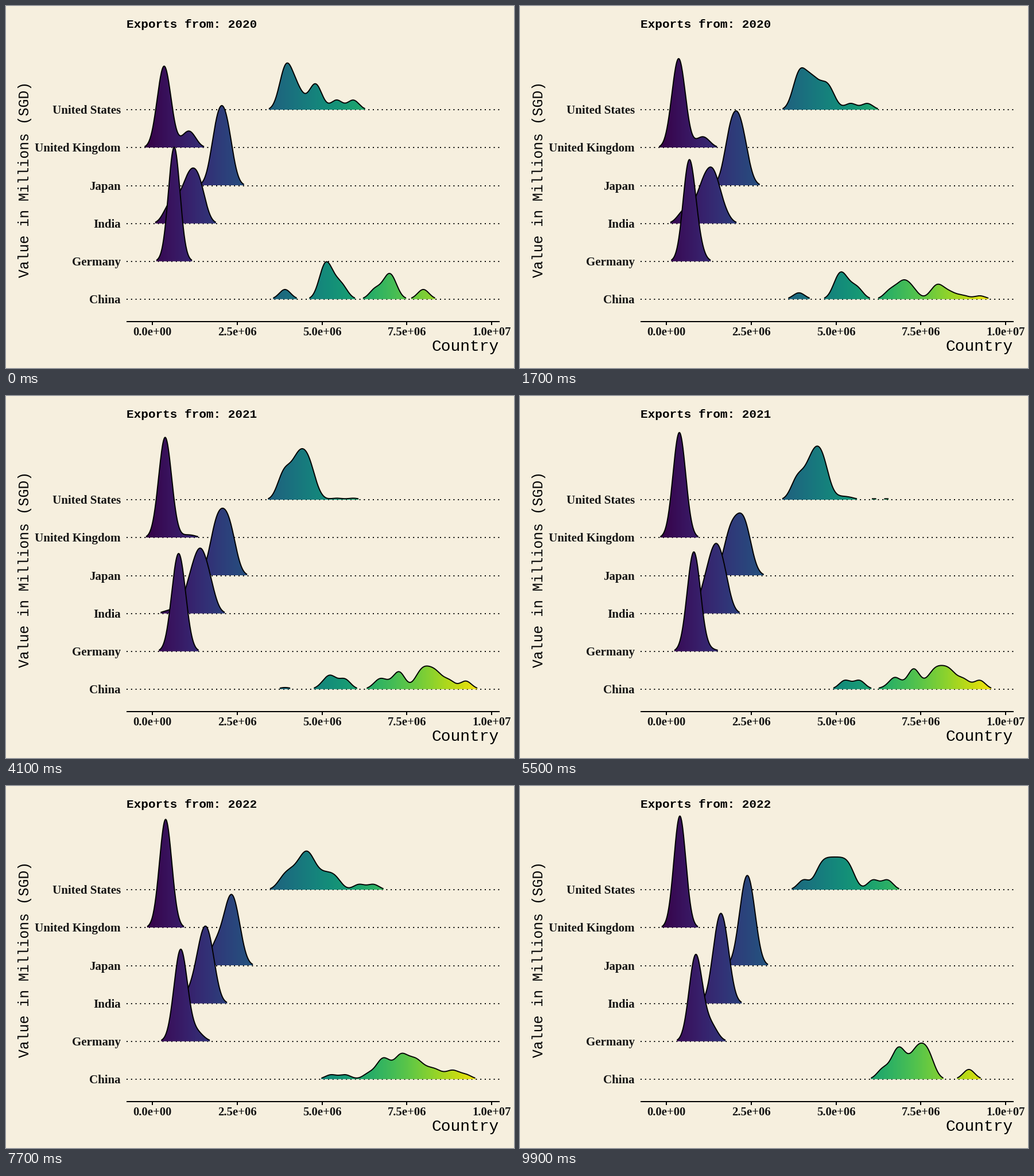
Write a matplotlib script that moves like this. It is 885 px wide and 632 px high and loops after 10 s.

```python
import numpy as np
import matplotlib.pyplot as plt
from matplotlib.animation import FuncAnimation
from matplotlib.path import Path

W, H, DPI = 885, 632, 100
PX = 72 / DPI
FRAMES, INTERVAL = 100, 100
BG, INK, TEXT = "#f6efde", "black", "#141414"
MONO, SERIF = "Liberation Mono", "Liberation Serif"
LEFT, RIGHT, AXIS_Y = 209.5, 859.5, 551
ROW0, ROW_STEP = 181.3, 66.1
BANDWIDTH = 10              # kernel width in pixels
UNIT = 16.9                 # height of one month's kernel
CUT = 0.0285 * ROW_STEP     # ridges are hidden below this height
X0, X1 = 238, 831           # span of the colour ramp

# For 2020, 2021 and 2022: clusters of evenly spaced months (first, last, count).
CLUSTERS = {
    "United States": ([(481, 495, 5), (504, 512, 2), (533, 545, 3), (576, 605, 2)],
                      [(478, 491, 3), (502, 533, 9)],
                      [(494, 494, 1), (519, 578, 9), (615, 640, 2)]),
    "United Kingdom": ([(266, 285, 10), (313, 324, 2)],
                       [(270, 285, 12)],
                       [(274, 283, 12)]),
    "Japan": ([(361, 391, 12)], [(358, 398, 12)], [(384, 408, 12)]),
    "India": ([(281, 299, 3), (310, 343, 9)],
              [(317, 339, 5), (335, 359, 7)],
              [(338, 362, 12)]),
    "Germany": ([(290, 296, 12)],
                [(294, 311, 12)],
                [(298, 314, 10), (326, 337, 2)]),
    "China": ([(486, 486, 1), (551, 563, 4), (575, 587, 2),
               (643, 643, 1), (662, 675, 3), (727, 727, 1)],
              [(566, 591, 2), (652, 652, 1), (684, 687, 2),
               (718, 754, 5), (772, 801, 2)],
              [(632, 632, 1), (651, 669, 4), (684, 716, 6), (782, 782, 1)]),
}

xs = np.linspace(X0, X1, 2 * (X1 - X0) + 1)


def density(clusters):
    months = np.concatenate([np.linspace(*c) for c in clusters])
    z = (xs[:, None] - months) / BANDWIDTH
    return UNIT * np.exp(-z ** 2 / 2).sum(axis=1)


fig = plt.figure(figsize=(W / DPI, H / DPI), dpi=DPI, facecolor=BG)
ax = fig.add_axes([0, 0, 1, 1])
ax.axis("off")


def label(x, y, text, size, font, **kw):
    return ax.text(x, y, text, fontsize=size * PX, family=font, va="baseline", **kw)


def rule(xv, yv, width, **kw):
    ax.plot(xv, yv, color=INK, lw=width * PX, dash_capstyle="butt",
            solid_capstyle="butt", **kw)


title = label(LEFT, 38, "", 21, MONO, weight="bold", color=INK)
label(859, 602, "Country", 28, MONO, ha="right", color=INK)
label(40.5, 303, "Value in Millions (SGD)", 24.8, MONO, color=INK,
      rotation=90, rotation_mode="anchor", ha="center")

rule([LEFT, RIGHT], [AXIS_Y, AXIS_Y], 2)
for i in range(5):
    x = 255.3 + 147.7 * i
    rule([x, x], [AXIS_Y, AXIS_Y + 6], 2)
    label(x, 575, f"{2.5e6 * i:.1e}", 20.8, SERIF, weight="bold",
          ha="center", color=TEXT)

# Viridis, slightly darkened.
ramp = plt.cm.viridis(np.linspace(0, 1, X1 - X0))[None, :, :3] ** 1.2

ridges = []
for i, (name, years) in enumerate(CLUSTERS.items()):
    base = ROW0 + i * ROW_STEP
    rule([LEFT, RIGHT], [base, base], 1.95, ls=(0, (1, 3)), zorder=1)
    label(200, base + 7, name, 21, SERIF, weight="bold", ha="right", color=TEXT)
    fill = ax.imshow(ramp, aspect="auto", zorder=2 + i,
                     extent=(X0, X1, base, base - 210))
    line, = ax.plot([], [], color=INK, lw=1.9 * PX, zorder=2.5 + i,
                    solid_capstyle="butt", solid_joinstyle="round")
    ridges.append((base, [density(c) for c in years], fill, line))

ax.set_xlim(0, W)
ax.set_ylim(H, 0)


def update(frame):
    t = 2 * frame / (FRAMES - 1)
    year = min(int(t), 1)
    mix = t - year
    title.set_text(f"Exports from: {2020 + round(t)}")
    for base, curves, fill, line in ridges:
        h = (1 - mix) * curves[year] + mix * curves[year + 1]
        shown = h >= CUT
        line.set_data(xs, np.where(shown, base - h, np.nan))
        top = np.column_stack([xs, base - np.where(shown, h, 0)])
        outline = np.vstack([[X0, base], top, [X1, base], [X0, base]])
        fill.set_clip_path(Path(outline), ax.transData)
    return [title]


anim = FuncAnimation(fig, update, frames=FRAMES, interval=INTERVAL,
                     repeat=True, repeat_delay=0, blit=False)
plt.show()
```
